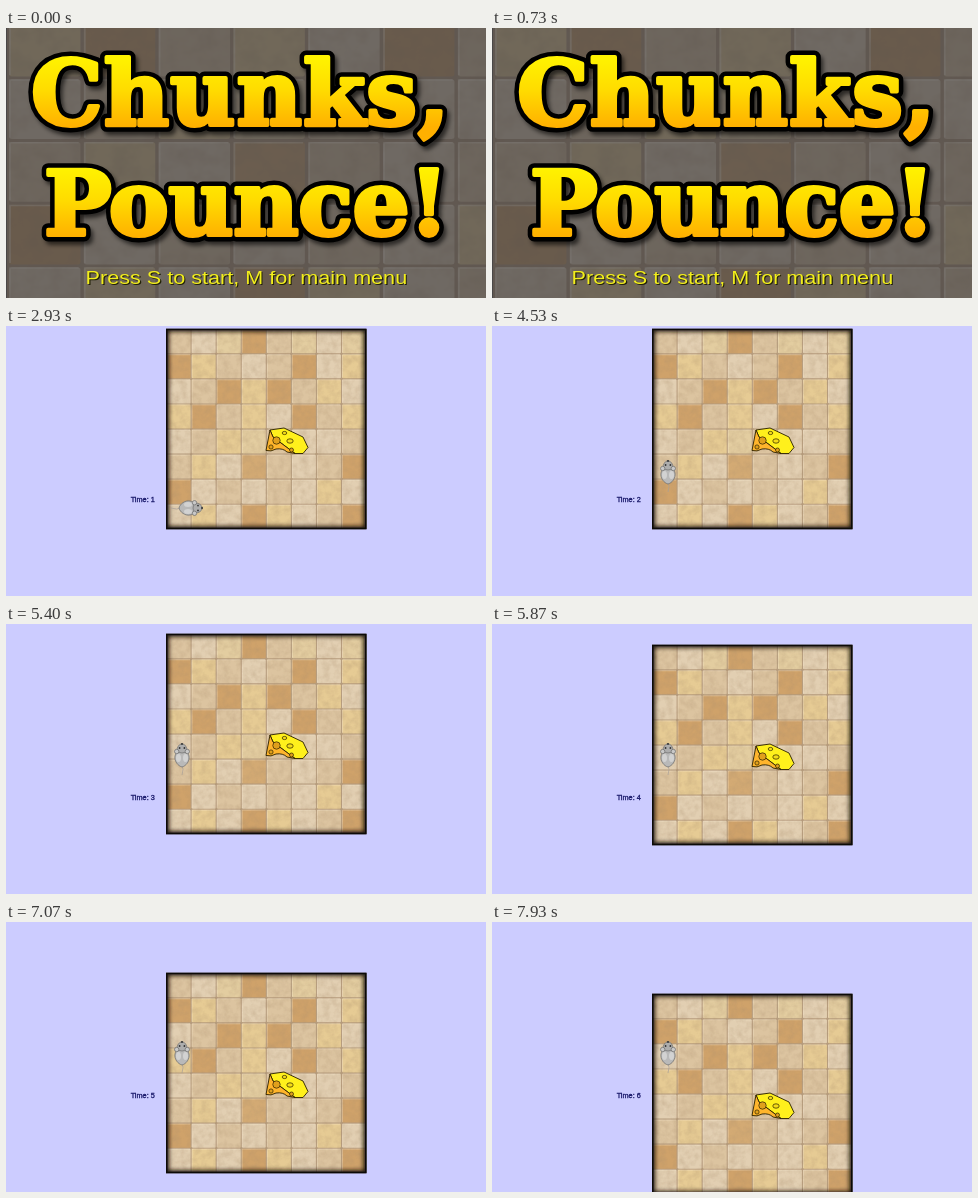
An HTML page for the animation above (8000 ms loop, 480x270 px).

```html
<!DOCTYPE html>
<html lang="en">
<head>
<meta charset="utf-8">
<title>Mouse game</title>
<style>
  html, body { margin: 0; width: 100%; height: 100%; overflow: hidden; background: #ccf; }
  svg { display: block; width: 100%; height: 100%; }
  .logo { font: bold 90px "DejaVu Serif", serif; stroke-linejoin: round; }
  .prompt { font: 18px "Liberation Sans", Arial, sans-serif; }
  .clock { font: 7.3px "Liberation Sans", Arial, sans-serif; fill: #18186a; stroke: #18186a; stroke-width: .3; }
</style>
</head>
<body>
<svg viewBox="0 0 480 270">
  <defs>
    <linearGradient id="gold" gradientUnits="userSpaceOnUse" x1="0" y1="-66" x2="0" y2="2">
      <stop offset="0" stop-color="#fff200"/>
      <stop offset=".45" stop-color="#ffdc00"/>
      <stop offset="1" stop-color="#ffb000"/>
    </linearGradient>
    <filter id="soft" x="-10%" y="-10%" width="120%" height="120%">
      <feGaussianBlur stdDeviation="2"/>
    </filter>
    <filter id="grain" x="0" y="0" width="100%" height="100%">
      <feTurbulence type="fractalNoise" baseFrequency=".14" numOctaves="3" seed="4"/>
      <feColorMatrix values="0 0 0 0 .4  0 0 0 0 .27  0 0 0 0 .15  .9 0 0 0 -.33"/>
    </filter>
    <clipPath id="edge"><rect width="200.5" height="200.5"/></clipPath>
    <g id="tiles"></g>
  </defs>

  <g id="game">
    <rect width="480" height="270" fill="#ccf"/>
    <g id="board">
      <g transform="translate(160 2.7)" clip-path="url(#edge)">
        <use href="#tiles"/>
        <rect width="200.5" height="200.5" fill="none" stroke="#1c140c" stroke-width="6" filter="url(#soft)"/>
        <rect width="200.5" height="200.5" fill="none" stroke="#0c0a08" stroke-width="3"/>
      </g>
      <g stroke="#2a2000" stroke-width=".9" stroke-linejoin="round">
        <path d="M264 104L278 102L297 111L302 121.500L297 127.500L289 127.500L267 111Z" fill="#fff01c"/>
        <path d="M264 104L260 124.500Q265 126 270 123Q277 122 281 126L289 127.500L267 111Z" fill="#ffb52c"/>
        <g fill="#e0a01c" stroke-width=".7">
          <circle cx="270.500" cy="114.500" r="3.700"/>
          <circle cx="265" cy="121" r="2.100"/>
          <circle cx="285.500" cy="124" r="2"/>
          <ellipse cx="284" cy="115" rx="3.200" ry="2.200" fill="#f4dc18"/>
          <ellipse cx="278.500" cy="107" rx="2.300" ry="1.600" fill="#f4dc18"/>
        </g>
      </g>
    </g>
    <g id="mouse" stroke="#6c6c6c" stroke-width=".7">
      <path d="M0 1Q2 5 0 11" fill="none" stroke="#a8a098"/>
      <path d="M0 3C-4 2 -8 -3 -7 -8C-6 -12 -4 -14 0 -14C4 -14 6 -12 7 -8C8 -3 4 2 0 3Z" fill="#b9b9b9"/>
      <g fill="#d2d2d2" stroke="none">
        <ellipse cx="-3.500" cy="-6" rx="2.500" ry="4"/>
        <ellipse cx="3.500" cy="-6" rx="2.500" ry="4"/>
      </g>
      <path d="M-5 -13Q-5 -19 0 -20.500Q5 -19 5 -13Q0 -9 -5 -13Z" fill="#adadad"/>
      <circle cx="-5.300" cy="-12.500" r="2.200" fill="#c8c8c8"/>
      <circle cx="5.300" cy="-12.500" r="2.200" fill="#c8c8c8"/>
      <g fill="#333" stroke="none">
        <circle cx="-2.400" cy="-16" r=".9"/>
        <circle cx="2.400" cy="-16" r=".9"/>
        <circle cx="0" cy="-20" r="1"/>
      </g>
    </g>
    <text id="clock" class="clock" x="124.700" y="175.600"></text>
  </g>

  <g id="title">
    <rect width="480" height="270" fill="#6e675f"/>
    <use href="#tiles" transform="translate(1 -201) scale(2.985 2.5)"/>
    <rect width="480" height="270" fill="#3a3a3e" opacity=".68"/>
    <g id="logo"></g>
    <g class="prompt" transform="scale(1.2 1)">
      <text x="67.300" y="257.200" fill="#222208">Press S to start, M for main menu</text>
      <text x="66.300" y="256" fill="#f2ee1c">Press S to start, M for main menu</text>
    </g>
  </g>
</svg>
<script>
const LOOP = 8000, GAME_AT = 1665, SECOND_AT = 1565;
const TURN_AT = 3416, SPEED = 0.0245, FREE_CLIMB = 42;
const $ = id => document.getElementById(id);

function add(parent, name, attrs, text = "") {
  const el = document.createElementNS("http://www.w3.org/2000/svg", name);
  for (const key in attrs) el.setAttribute(key, attrs[key]);
  el.textContent = text;
  return parent.appendChild(el);
}

// d: brown, y: yellow, t: tan, s: sand, l: light
const pattern = ["sltdstlt", "dyslsdly", "lsdydsyl", "ydsyldsy",
                 "lsytslls", "sylDslsd", "dlslslyl", "lyldylsd"];
const shades = { d: "#cfa26a", D: "#d3aa74", y: "#e6cb94", t: "#e3cda0", s: "#dcc4a0", l: "#e2cfb2" };

function buildTiles() {
  const g = $("tiles"), size = 25.06;
  add(g, "rect", { width: 200.5, height: 200.5, fill: "#b59b7c" });
  pattern.forEach((row, r) => [...row].forEach((c, k) => {
    const x = k * size, y = r * size;
    add(g, "rect", { x: x + .7, y: y + .7, width: 23.9, height: 23.9, rx: 1, fill: shades[c] });
    add(g, "path", { d: `M${x + 1} ${y + 24}V${y + 1}H${x + 24}`, fill: "none",
      stroke: "#fff3dc", "stroke-width": .6, opacity: .55 });
  }));
  add(g, "rect", { width: 200.5, height: 200.5, filter: "url(#grain)", opacity: .6 });
}

function logoLine(text, x, y, spacing) {
  const g = add($("logo"), "g", { class: "logo", transform: `translate(${x} ${y})`, "letter-spacing": spacing });
  const layer = attrs => add(g, "text", attrs, text);
  layer({ x: 3, y: 4, stroke: "#000", "stroke-width": 12, opacity: .6, filter: "url(#soft)" });
  layer({ fill: "#000", stroke: "#000", "stroke-width": 13 });
  layer({ fill: "url(#gold)", stroke: "url(#gold)", "stroke-width": 4 });
}

function draw(t) {
  const playing = t >= GAME_AT;
  $("title").style.display = playing ? "none" : "";
  $("game").style.display = playing ? "" : "none";
  if (!playing) return;

  // The mouse climbs freely, then the camera follows it.
  const climb = Math.max(0, (t - TURN_AT) * SPEED);
  const scroll = Math.round(Math.max(0, climb - FREE_CLIMB));
  const y = Math.round(182 - Math.min(climb, FREE_CLIMB));
  $("board").setAttribute("transform", `translate(0 ${scroll})`);
  $("mouse").setAttribute("transform", `translate(176 ${y}) rotate(${t < TURN_AT ? 90 : 0})`);
  $("clock").textContent = "Time: " + Math.floor((t - SECOND_AT) / 1000);
}

buildTiles();
logoLine("Chunks,", 25, 97, 1);
logoLine("Pounce!", 38, 207, -.5);

const start = performance.now();
function tick() {
  draw((performance.now() - start) % LOOP);
  requestAnimationFrame(tick);
}
tick();
</script>
</body>
</html>
```
